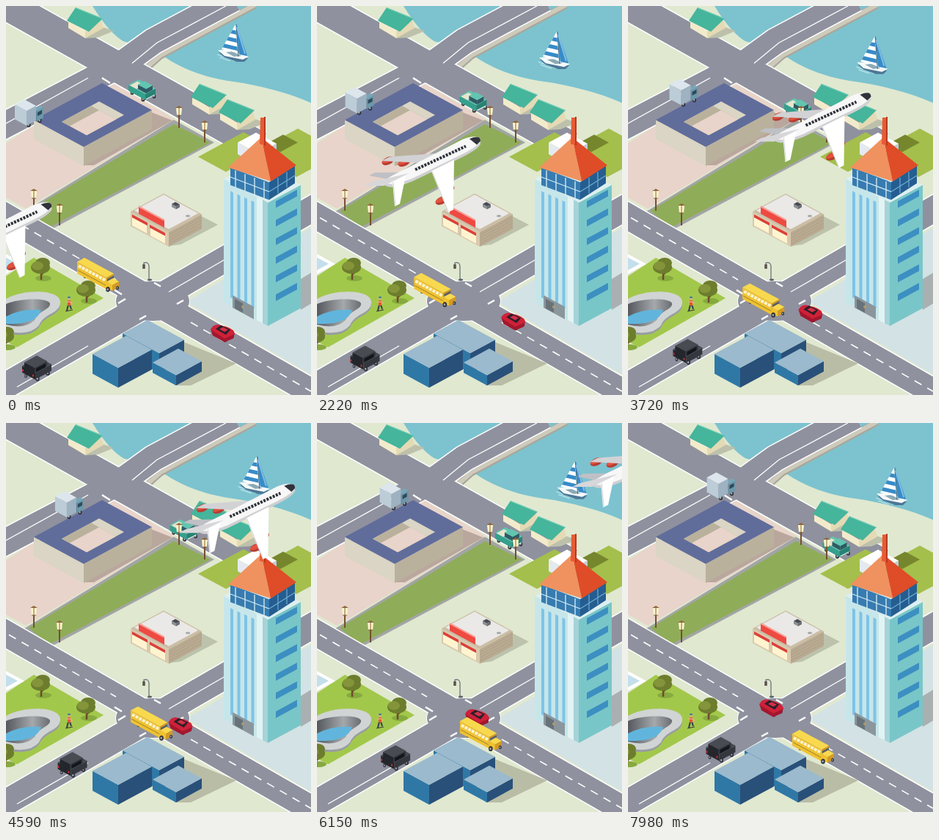
Write an HTML page that moves like this. It is 416 px wide and 530 px high and loops after 8000 ms.

```html
<!DOCTYPE html>
<html lang="en">
<head>
<meta charset="utf-8">
<title>Isometric city</title>
<style>
html, body { margin: 0; width: 100%; height: 100%; overflow: hidden; background: #e0e8d0; }
svg { display: block; width: 416px; height: 530px; }
</style>
</head>
<body>
<svg id="stage" viewBox="0 0 416 530"></svg>
<script>
const SLOPE = 0.54;
const ROAD = '#8f919e', WHITE = '#fff', DARK = '#30333a';

const poly = (fill, points) => `<polygon fill="${fill}" points="${points}"/>`;
const path = (fill, d) => `<path fill="${fill}" d="${d}"/>`;
const line = (color, width, d, extra = '') =>
  `<path fill="none" stroke="${color}" stroke-width="${width}" d="${d}" ${extra}/>`;
const oval = (fill, x, y, rx, ry = rx, turn = 0) =>
  `<ellipse fill="${fill}" cx="${x}" cy="${y}" rx="${rx}" ry="${ry}" transform="rotate(${turn} ${x} ${y})"/>`;
const repeat = (n, make) => Array.from({ length: n }, (_, i) => make(i)).join('');

// Upright panel; its top edge starts at x, y and follows the slope.
const slab = (fill, x, y, w, h, slope = SLOPE) =>
  path(fill, `M${x} ${y}l${w} ${w * slope}v${h}l${-w} ${-w * slope}z`);
// Flat diamond; x, y is its front corner, a and b its reach to the left and right.
const tile = (fill, x, y, a, b) =>
  path(fill, `M${x} ${y}l${-a} ${-a * SLOPE}l${b} ${-b * SLOPE}l${a} ${a * SLOPE}z`);
const box = (x, y, a, b, h, [top, left, right]) =>
  slab(left, x - a, y - h - a * SLOPE, a, h) + slab(right, x, y - h, b, h, -SLOPE) + tile(top, x, y - h, a, b);
const wheel = (x, y, r = 3) => oval(DARK, x, y, r * .8, r) + oval('#a9adb2', x - .3, y, r * .35, r * .45);

function ground() {
  return path('#7cc3cf', 'M118 0Q140 36 160 48L206 62C240 88 275 98 310 103S385 118 416 132V0Z')
    + poly('#e8d4ca', '0,187 136,99 230,154 27,276 0,261')
    + poly('#a2a5a4', '25,280 229,155 284,186 57,307')
    + poly('#8fad58', '31,279 229,161 279,186 58,302')
    + poly('#d3e2e4', '246,403 416,302 416,502')
    + poly('#a2c84b', '0,368 38,343 133,398 15,465 0,457')
    + tile(WHITE, 0, 365, 25, 25) + tile('#c3dfeb', 0, 360, 16, 16);
}

function roads() {
  const routes = [
    ['M-20 -13L345 191', 44],
    ['M-20 172L158 79L201 48L310 -10', 38],
    ['M-20 275.5L440 539', 38],
    ['M-40 540L440 263.5', 38],
  ];
  const paint = (color, inset) => routes.map(([d, width]) =>
    line(color, width - inset, d, 'stroke-linejoin="round"')).join('');
  const rightLane = line('#a9a79b', 9, 'M185 91L211 68L340 -1') + line('#cdcabc', 6, 'M185 90L211 67L340 -2');
  return rightLane
    + paint(WHITE, 0) + oval(WHITE, 200, 402, 51, 28) + paint(ROAD, 3) + oval(ROAD, 200, 402, 50, 27)
    + line(WHITE, 1.6, 'M4 288.5L150 373M252 431L416 525', 'stroke-dasharray="11 9"')
    + line(WHITE, 1.3, 'M0 160L112 98M172 78L206 50L300 0M222 389.5L300 344.5M15 519L112 463')
    + line(WHITE, 2.5, 'M153 405l10 -6M158 393l-10 -6M202 377l9 5M233 406l9 -5M182 427l9 -5M131 98l11 7');
}

function house(x, y) {
  const art = poly('#bdc1ab', '24,43 47,27 64,33 42,42')
    + slab('#f2ebcb', 2, 19, 23, 10, .6) + poly('#e4dab5', '25,43 25,33 46,15 50,29')
    + poly('#45b59c', '0,19 12,1 49,16 30,34') + line('#78cfb8', 1.2, 'M12 1.5L48 16');
  return `<g transform="translate(${x} ${y})">${art}</g>`;
}

function school() {
  const lit = '#dad5c4', shade = '#bab19d';
  return poly('#b9a79d', '199,145 227,156 120,217 106,217')
    + box(106, 218, 68, 93, 26, ['#606d9b', lit, shade])
    + tile(lit, 110, 176, 34, 51) + tile(shade, 110, 176, 34, 40) + tile('#e8d4ca', 110, 176, 23, 40);
}

function store() {
  return poly('#bcc2ab', '262,284 289,298 238,325 222,327')
    + box(222, 328, 52, 45, 20, ['#cbbda5', '#d8c9ae', '#b9aa91'])
    + repeat(4, i => line('#a29480', .5, `M222 ${312 + i * 4}l45 ${-45 * SLOPE}`))
    + tile('#eae9e7', 222, 304, 47, 40)
    + repeat(2, i => slab('#fff4cf', 172 + i * 25, 288 + i * 14, 20, 11)
      + slab('#dc3f38', 172 + i * 24, 284 + i * 14, 21, 4))
    + slab('#ee4a42', 181, 273, 35, 10) + line('#f7a097', 2, `M181 273l35 ${35 * SLOPE}`)
    + box(232, 277, 6, 5, 4, ['#4a4e54', '#8c9094', '#6b7075']) + oval('#a5a8aa', 248, 286, 3, 1.5);
}

function park() {
  const tree = (x, y) => oval('#86aa3e', x + 4, y + 15, 11, 4)
    + line('#704a2c', 2.5, `M${x + 1} ${y + 17}v-14m0 7l5 -5`)
    + oval('#6d7d2e', x, y, 13, 9) + oval('#6d7d2e', x + 3, y - 6, 10, 7) + oval('#84943a', x - 4, y - 2, 8, 6);
  const rim = 'M0 399C25 385 73 386 74 403C75 419 52 418 45 435Q33 450 0 443Z';
  const bowl = `<g transform="translate(0 3)">${path('#989da0', rim)}</g>` + path('#d1d4d4', rim)
    + path('url(#bowl)', 'M0 406C18 398 56 397 60 405C61 414 45 414 39 428Q25 441 0 434Z')
    + path('#61b5dc', 'M0 423Q20 412 48 414Q42 435 0 433Z');
  const skater = line('#343d4a', 2, 'M85 407l-2 8m4 -8l2 6') + line('#e65531', 4, 'M86 401v7')
    + line('#e9ad83', 1.4, 'M82 403h5l4 3') + oval('#e9ad83', 86, 399, 1.8) + oval('#377aa8', 86, 397, 2, 1.2)
    + line(DARK, 1, 'M81 416l10 -2');
  return bowl + tree(47, 356) + tree(109, 387) + tree(-2, 450) + skater;
}

function offices() {
  const blues = ['#9bbacd', '#2f78a6', '#285079'];
  return poly('#b9bda6', '238,456 314,487 252,517 230,517')
    + box(209, 500, 50, 34, 27, blues) + box(153, 520, 35, 46, 27, blues) + box(232, 517, 32, 35, 14, blues);
}

const streetLamp = () => line('#747d80', 1.4, 'M195 373v-19q-1 -6 -7 -4v3')
  + line('#59534d', 3.5, 'M188 352v6') + oval('#59666b', 196, 373, 3, 1.5);

const lantern = (x, y) => line('#74502e', 2, `M${x} ${y}v-19`)
  + path('#fff5ca', `M${x - 4} ${y - 27}h8l-1 10h-6z`) + line('#74502e', .9, `M${x} ${y - 27}v10m-3 0h6`)
  + path('#8f673c', `M${x - 5} ${y - 27}l5 -3l5 3z`);

function garden() {
  return tile('#a4bf4c', 300, 226, 38, 62) + tile('#a4bf4c', 396, 233, 60, 62)
    + tile('#76862d', 374, 199, 20, 24)
    + box(344, 217, 28, 25, 16, [WHITE, '#e5eaf0', '#c4cbd7']);
}

function tower() {
  const shaft = slab('#aab0b2', 402, 372, 14, 42, -.6)
    + box(357, 436, 60, 45, 168, ['#dceff0', '#c6e6ea', '#79c6c8'])
    + repeat(4, i => slab('#7fc3e6', 306 + i * 9.5, 252 + i * 4.3, 4, 145))
    + slab('#e2f3f3', 342, 260, 8, 168) + slab('#a5d3d8', 350, 264, 7, 168)
    + repeat(6, i => slab('#3c8fc1', 368, 266 + i * 25.4, 29, 9, -SLOPE))
    + slab('#8b969c', 309, 394, 29, 17) + slab('#677279', 312, 399, 11, 13) + oval('#ad9971', 323, 410, 2);
  const lounge = slab('#377bb0', 306, 220, 53, 24, .38) + slab('#255d91', 359, 240, 35, 24, -.64)
    + repeat(4, i => line('#cfe9f2', 1.4, `M${313 + i * 13} ${224 + i * 5}v23`))
    + line('#cfe9f2', 1.2, 'M306 233l53 20') + line('#6dadd2', 1.2, 'M359 253l35 -22M371 234v21M383 226v21');
  const roof = poly('#ef925f', '348,179 303,220 361,239') + poly('#df4c28', '348,179 361,239 396,217')
    + poly('#e75b34', '346,188 347,152 354,152 354,190') + line('#b9381f', 2, 'M353 151v39');
  return shaft + lounge + roof;
}

// Each mover is drawn where it stands at its reference time.
const grays = ['#dce6ec', '#bccdd8', '#9eb2c1'];
const yellows = ['#f8d94e', '#efc232', '#d39a22'];
const greens = ['#62c5b0', '#35a08c', '#278273'];
const blacks = ['#484b52', '#24262c', '#34373e'];

const truck = wheel(31, 162, 3.3) + wheel(46, 156, 3.2)
  + box(42, 157, 5, 9, 14, ['#78a7b8', '#567f92', '#6b98aa']) + slab('#304858', 43, 145, 6, 5, -SLOPE)
  + box(28, 163, 16, 13, 20, grays);

const pickup = wheel(172, 118) + wheel(187, 127, 3.2) + wheel(202, 123)
  + box(190, 128, 23, 14, 8, greens) + tile('#e7e5ce', 178, 113, 9, 10)
  + box(191, 119, 11, 9, 6, [greens[0], '#2f5a64', '#2f5a64']) + line('#dceee6', 1.2, 'M191 127l12 -6');

const bus = wheel(108, 368) + box(137, 386, 40, 10, 16, yellows)
  + slab('#58606a', 138, 372, 9, 6, -SLOPE) + box(145, 388, 8, 9, 8, yellows)
  + wheel(139, 386, 3.5) + wheel(152, 384, 2.5)
  + line('#fbf3cf', 4, `M99 354l37 ${37 * SLOPE}`, 'stroke-dasharray="4 1.3"')
  + line('#8a7028', .8, `M98 360l38 ${38 * SLOPE}`);

const redCar = wheel(284, 446, 2.8) + wheel(299, 455) + wheel(309, 450, 2.5)
  + path('#a3172d', 'M279 440L297 450L312 446L310 453L298 458L282 449Z')
  + path('#cf2139', 'M279 441Q282 434 289 434L301 437Q312 441 312 447L298 453Z')
  + path('#2b2029', 'M286 440L293 435L306 441L300 448Z') + tile('#d63048', 298, 444, 7, 5);

const van = wheel(57, 500, 3.5) + box(40, 509, 18, 22, 9, blacks) + box(39, 500, 14, 17, 7, blacks)
  + slab('#14171d', 41, 494, 13, 5, -SLOPE) + wheel(43, 508, 3.3) + wheel(27, 504, 2.5)
  + line('#bd3030', 2, 'M23 495v3M37 502v3');

function sailboat() {
  const onSail = (x, y, t) => `${313 + (x - 313) * t},${25 + (y - 25) * t}`;
  const stripe = t => poly('#378bc8', [onSail(294, 59, t), onSail(316, 64, t), onSail(316, 64, t + .14), onSail(294, 59, t + .14)].join(' '));
  return line('#b9e5ed', 1.3, 'M288 66l24 9M291 70l15 5')
    + path('#4d7796', 'M290 63L330 71L325 76H315L298 70Z') + path('#f4f9fa', 'M289 60H307L331 69L323 73L298 68Z')
    + path('#8caab5', 'M300 63l9 -1l12 6l-10 1z') + line('#46647a', 1, 'M314 25l3 44')
    + poly(WHITE, '313,25 294,59 316,64') + repeat(3, i => stripe(.22 + i * .28))
    + poly('#378bc8', '314,24 329,68 318,66') + line('#83bee6', 2, 'M315 29l11 36');
}

function airliner() {
  // Root runs along the fuselage; the tip lies dx, dy away.
  const wing = (fill, x, y, root, dx, dy, tip) =>
    path(fill, `M${x} ${y}l${root} ${-root / 2}L${x + dx + tip} ${y + dy - tip / 2}l${-tip} ${tip / 2}z`);
  const engine = (x, y) => oval('#b93c32', x, y, 9, 5, -25) + oval('#e2523d', x - 1, y - 1, 8, 3, -25);
  const hull = 'M91 239C103 229 120 223 140 212L198 182C212 176 224 177 223 184Q220 191 198 202L130 235C112 242 98 246 91 239Z';
  return engine(97, 211) + engine(119, 213) + wing('#d2d2d5', 146, 214, 28, -58, -3, 11)
    + wing('#bfc0c5', 101, 237, 21, -30, -6, 8) + engine(179, 250) + engine(170, 265)
    + `<g transform="translate(0 4)">${path('#cfcfd2', hull)}</g>` + path('#f7f7f7', hull)
    + path(DARK, 'M208 181Q223 175 223 184L218 189Z')
    + line(DARK, 4, 'M134 223L203 191', 'stroke-dasharray="3 1.6"')
    + wing('#d7d7da', 91, 245, 35, -27, 0, 10)
    + wing(WHITE, 103, 240, 18, 3, 33, 7) + wing(WHITE, 156, 225, 31, 23, 56, 7)
    + line('#d2d2d7', 1, 'M157 225l22 55M104 240l3 32');
}

const SPAN = 7980, LOOP = 8000, STEP = 30;
// Travel is the distance covered during one span.
const movers = {
  boat: { art: sailboat(), travel: [50, 36] },
  pickup: { art: pickup, travel: [98.5, 54.5] },
  truck: { art: truck, travel: [95.5, -60] },
  redCar: { art: redCar, travel: [-100, -57.5] },
  bus: { art: bus, travel: [127, 75] },
  van: { art: van, travel: [84.5, -48.5] },
  plane: { art: airliner(), travel: [577, -321], start: 2220 },
};
const moving = id => `<g id="${id}">${movers[id].art}</g>`;

document.getElementById('stage').innerHTML =
  `<defs><linearGradient id="bowl"><stop stop-color="#55585e"/><stop offset=".6" stop-color="#a5a9ac"/>
   <stop offset="1" stop-color="#696d72"/></linearGradient></defs>`
  + ground() + roads() + moving('boat')
  + house(83, 1) + house(252, 105) + house(290, 126) + school() + store() + garden()
  + moving('pickup') + moving('truck')
  + lantern(236, 166) + lantern(271, 186) + lantern(38, 279) + lantern(73, 299)
  + park() + streetLamp() + moving('redCar') + moving('bus')
  + offices() + moving('van') + tower() + moving('plane');

const began = performance.now();
function draw() {
  const elapsed = (performance.now() - began) % LOOP;
  const time = Math.floor(elapsed / STEP) * STEP;
  for (const [id, { travel, start = 0 }] of Object.entries(movers)) {
    const [x, y] = travel.map(distance => distance * (time - start) / SPAN);
    document.getElementById(id).setAttribute('transform', `translate(${x.toFixed(2)} ${y.toFixed(2)})`);
  }
  requestAnimationFrame(draw);
}
draw();
</script>
</body>
</html>
```
